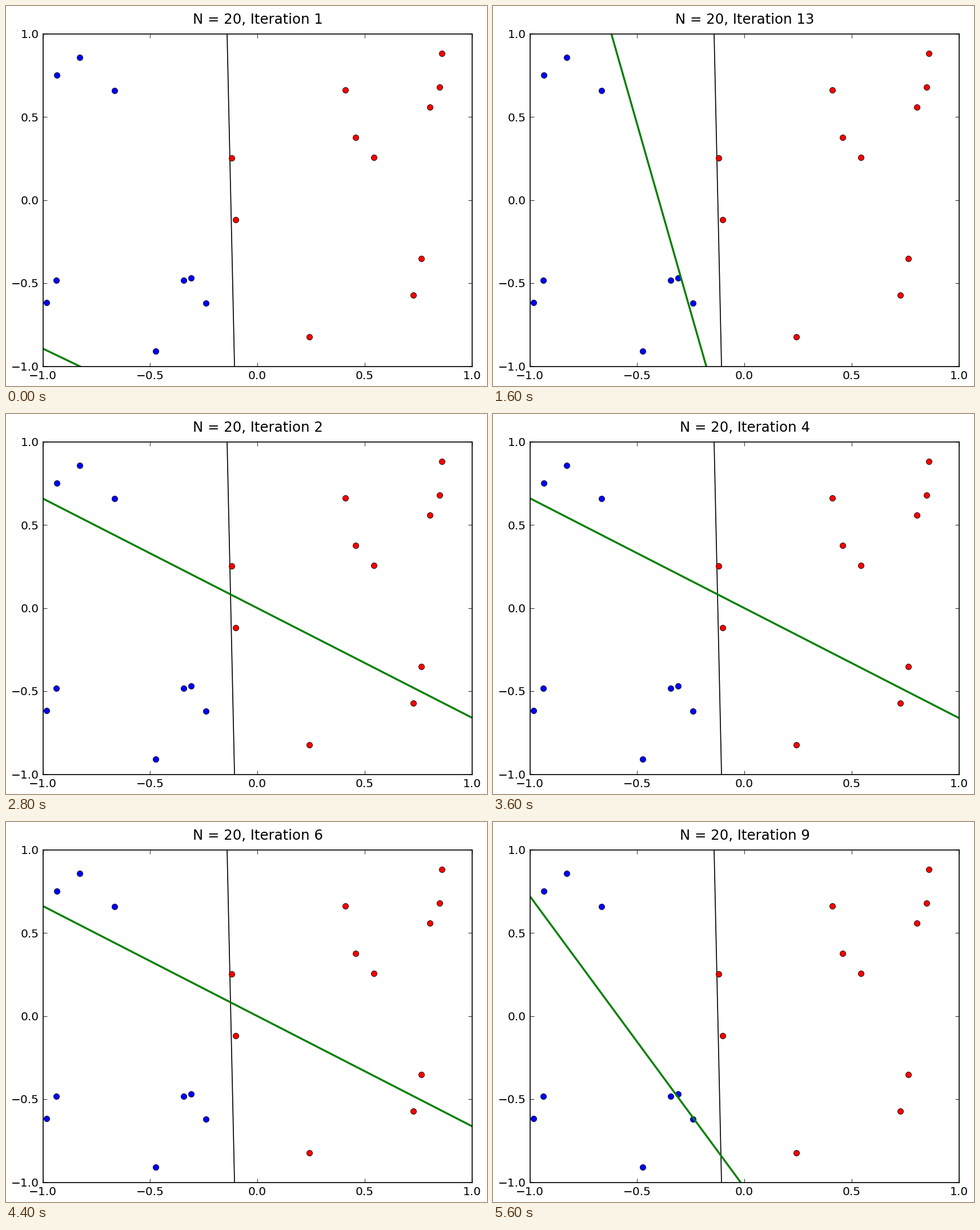
A matplotlib script for the animation above (6 s loop, 842x665 px).

```python
import numpy as np
import matplotlib.pyplot as plt
from matplotlib.animation import FuncAnimation

W, H, DPI = 842, 665, 100
LEFT, RIGHT, TOP, BOTTOM = 64.6, 815.5, 48.8, 630.6
UNIT = 121 / DPI       # scale of type, markers and line widths
LIMITS = np.array([-1, 1])

plt.rcParams["font.family"] = "DejaVu Sans"

# The learner visits the points in this order.
points = np.array([
    (.4095, .661), (-.3432, -.4813), (-.1013, -.1186), (-.6661, .66),
    (-.2411, -.62), (-.829, .858), (-.936, .752), (-.939, -.484),
    (-.984, -.615), (-.31, -.467), (-.473, -.91), (-.121, .253),
    (.458, .377), (.542, .2585), (.803, .561), (.85, .678),
    (.86, .884), (.763, -.35), (.726, -.573), (.241, -.823)])


def boundary(y):
    """x of the true dividing line."""
    return -0.1239 - 0.0173 * y


x, y = points.T
labels = np.where(x > boundary(y), 1, -1)


def learn():
    """Perceptron: correct the first misclassified point until none is left."""
    inputs = np.column_stack([np.ones(len(points)), points])
    weights, history = np.zeros(3), []
    while (wrong := labels * (inputs @ weights) <= 0).any():
        first = wrong.argmax()
        weights = weights + labels[first] * inputs[first]
        history.append(weights)
    return history


history = learn()
order = sorted(range(1, len(history) + 1), key=str)   # 1, 10, 11, ..., 2, 3

fig = plt.figure(figsize=(W / DPI, H / DPI), dpi=DPI, facecolor="white")
ax = fig.add_axes([LEFT / W, 1 - BOTTOM / H,
                   (RIGHT - LEFT) / W, (BOTTOM - TOP) / H])
ticks = np.linspace(*LIMITS, 5)
ax.set(xlim=LIMITS, ylim=LIMITS, xticks=ticks, yticks=ticks)
ax.set_autoscale_on(False)
ax.tick_params(direction="in", length=4 * UNIT, width=0.5 * UNIT,
               top=True, right=True, labelbottom=False, labelleft=False)
for spine in ax.spines.values():
    spine.set_linewidth(UNIT)


def write(px, baseline, text, size, ha="center"):
    """Text placed in pixels from the top left."""
    return fig.text(px / W, 1 - baseline / H, text, fontsize=size * UNIT,
                    ha=ha, va="baseline")


for t in ticks:
    text = f"{t:.1f}".replace("-", "\u2212")
    share = (t + 1) / 2
    write(LEFT + share * (RIGHT - LEFT), 653, text, 12)
    write(58, round(BOTTOM - share * (BOTTOM - TOP) + 7.3), text, 12, "right")

title = write(440.5, 31, "", 14.5)

ax.plot(boundary(LIMITS), LIMITS, color="black", lw=UNIT)
for label, color in ((-1, "#0000ff"), (1, "#ff0000")):
    ax.plot(*points[labels == label].T, "o", color=color, ms=6 * UNIT,
            mec="black", mew=0.5 * UNIT, snap=False)
guess, = ax.plot([], [], color="#008000", lw=2 * UNIT)


def draw(frame):
    step = order[frame]
    bias, wx, wy = history[step - 1]
    span = 2 * LIMITS
    guess.set_data(span, -(bias + wx * span) / wy)
    title.set_text(f"N = {len(points)}, Iteration {step}")
    return guess, title


anim = FuncAnimation(fig, draw, frames=len(order), interval=400, repeat=True)
plt.show()
```
